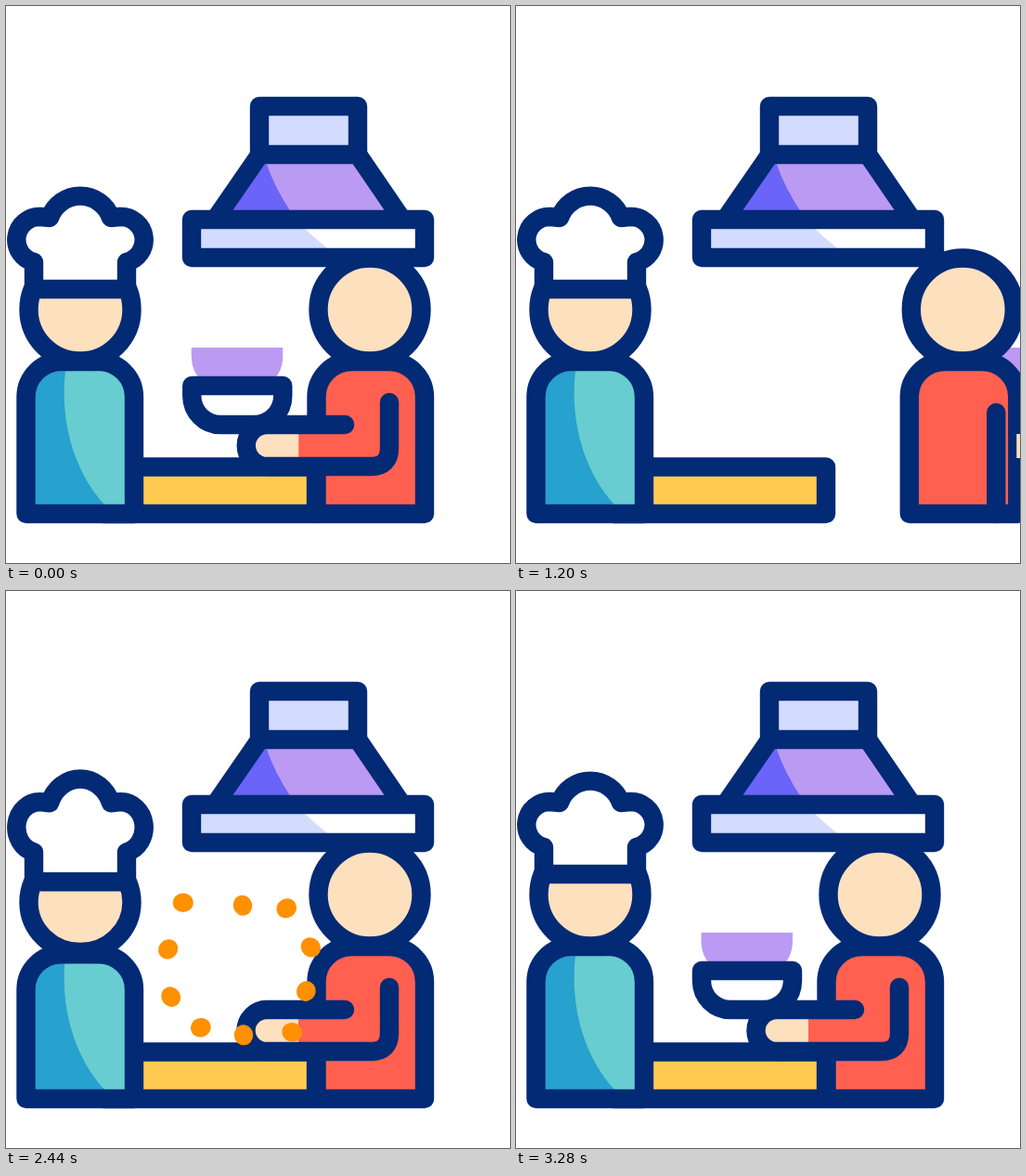
Write an HTML page with a canvas that moves like this. It is 543x600 px and loops after 3.3 s.

```html
<!DOCTYPE html>
<html lang="en">
<head>
<meta charset="utf-8">
<title>Kitchen service</title>
<style>
  html, body { margin: 0; width: 100%; height: 100%; overflow: hidden; background: #fff; }
  canvas { display: block; }
</style>
</head>
<body>
<canvas id="stage" width="543" height="600"></canvas>
<script>
const ctx = document.getElementById('stage').getContext('2d');
const LOOP = 3300;
const NAVY = '#032a75', SKIN = '#fde0be', RED = '#ff6050', YELLOW = '#fecb50', TEAL = '#68cdd0',
      BLUE = '#27a1cd', PURPLE = '#bb9af3', INDIGO = '#6a64f8', PALE = '#d3dcff', ORANGE = '#ff9000';
const SPARKS = [[-59, -72], [5, -69], [52, -66], [78, -24], [73, 23],
                [58, 67], [6, 70], [-40, 62], [-72, 29], [-75, -22]];

const clamp = v => Math.max(0, Math.min(1, v));
const ramp = (t, a, b) => clamp((t - a) / (b - a));

// Piecewise linear value through [time, value] pairs.
function keys(t, list) {
  let value = list[0][1];
  for (let i = 1; i < list.length; i++) {
    value += (list[i][1] - list[i - 1][1]) * ramp(t, list[i - 1][0], list[i][0]);
  }
  return value;
}

function fill(d, color) {
  ctx.fillStyle = color;
  ctx.fill(new Path2D(d));
}

function line(d) {
  ctx.stroke(new Path2D(d));
}

function shape(d, color) {
  fill(d, color);
  line(d);
}

function group(draw, x = 0, y = 0) {
  ctx.save();
  ctx.translate(x, y);
  draw();
  ctx.restore();
}

const bodyPath = dy => `M21.5 547V${421 + dy}A38 38 0 0 1 59.5 ${383 + dy}H100A38 38 0 0 1 138 ${421 + dy}V547Z`;

function head(x, y, ry) {
  ctx.beginPath();
  ctx.ellipse(x, y, 55.5, ry, 0, 0, 7);
  ctx.fillStyle = SKIN;
  ctx.fill();
  ctx.stroke();
}

function hood() {
  fill('M273 165L230 228H425L384 165Z', PURPLE);
  fill('M280 168Q289 195 307 222H230L270 165Z', INDIGO);
  line('M273.5 160L226.5 228M379 160L425.5 228');
  shape('M273 108H379V160H273Z', PALE);
  fill('M200 230H451V271H200Z', '#fff');
  fill('M200 230H312Q330 249 359 271H200Z', PALE);
  line('M200 230H451V271H200Z');
}

function chef(dy) {
  const down = dy > 0;
  const sy = 1 + dy * (down ? 0.0125 : 0.0045);
  const puff = down ? 0 : -dy * 0.37;
  const y = v => 305 + dy - (305 - v) * sy;

  fill(bodyPath(dy), '#fff');
  group(() => {
    const top = 393 + dy / 2;
    ctx.clip(new Path2D(`M21 547V${top + 32}A42 32 0 0 1 63 ${top}H96A42 32 0 0 1 138 ${top + 32}V547Z`));
    fill('M21 370H138V547H21Z', TEAL);
    fill('M21 370H68Q65 384 64 393C58 445 72 500 106 537V547H21Z', BLUE);
  });
  line(bodyPath(dy));
  head(80, 327 + dy, 55.5 - Math.abs(dy) * 0.22);

  const puffRadius = `${24.9 + puff} ${24.9 * sy}`;
  shape(`M30 ${305 + dy}V${y(276)}A${puffRadius} 0 0 1 ${37 - puff / 2} ${y(227)}L47 ${y(228)}
    A35 ${35 * sy} 0 0 1 113 ${y(228)}L${123 + puff / 2} ${y(227)}
    A${puffRadius} 0 0 1 130 ${y(276)}V${305 + dy}Z`, '#fff');
}

function bowl(lift, pop) {
  ctx.translate(249, 430);
  ctx.scale(pop, pop);
  ctx.translate(-249, -430);
  group(() => {
    ctx.rotate(-lift * 0.0014);
    fill('M-49.5 -16H49V-8Q49 16 30 24H-30Q-49.5 16 -49.5 -8Z', PURPLE);
  }, 249, 384 + lift * 0.33);
  shape('M200 409H298V420A31 31 0 0 1 267 451H231A31 31 0 0 1 200 420Z', '#fff');
}

function waiter(turn, lift, pop) {
  const turned = turn > 0.55;
  const move = 223 * turn;
  const elbow = { x: 393 + 35 * turn, y: 496 + 51 * turn };
  const shoulder = { x: 413 + 15 * turn, y: 427 + 11 * turn };
  const sleeve = `Q${shoulder.x} ${elbow.y} ${shoulder.x} ${elbow.y - 20}V${shoulder.y}`;
  const tip = 258 + move;

  if (pop) group(() => bowl(lift, pop), 227 * turn);
  if (turned) line(`M${tip - 41} 451H${tip - 10}Q${tip} 451 ${tip} 461V482L${tip - 10} 492H${tip - 41}`);

  head(392, 327, 55.5);
  group(() => shape(bodyPath(0), RED), 313);

  if (turned) {
    line(`M${elbow.x} ${elbow.y}${sleeve}`);
    // The palm shows only past the inner edge of the body outline.
    group(() => {
      ctx.clip(new Path2D('M450 440H543V520H450Z'));
      fill(`M${tip - 41} 461H${tip - 20}A12 13 0 0 1 ${tip - 20} 487H${tip - 41}Z`, SKIN);
    });
  } else {
    const hand = 281 + move, cuff = 315 + move, end = 365 + 85 * turn;
    const arc = `${hand} 451A22.5 22.5 0 0 0 ${hand} 496`;
    fill(`M${Math.max(cuff, end)} 451L${arc}L${elbow.x} ${elbow.y}Z`, RED);
    fill(`M${cuff} 451L${arc}H${cuff}Z`, SKIN);
    line(`M${end} 451L${arc}L${elbow.x} ${elbow.y}${sleeve}`);
  }
}

function sparks(t) {
  const spread = (t - 2210) / 230;
  const size = 11 * Math.min(ramp(t, 2210, 2310), 1 - ramp(t, 2520, 2660));
  if (size <= 0) return;
  ctx.fillStyle = ORANGE;
  SPARKS.forEach(([x, y], i) => {
    ctx.beginPath();
    ctx.ellipse(250 + x * spread, 408 + y * spread, size, size * 0.93, i * 1.3, 0, 7);
    ctx.fill();
  });
}

function draw(t) {
  const leaving = t < 1760;
  const shift = leaving ? Math.max(0, t - 900) * 0.2967 : Math.max(0, 2210 - t) * 0.882;
  const bounce = keys(t, [[2340, 0], [2560, 18], [2780, -32], [3280, 0]]);
  const turn = leaving ? ramp(t, 0, 900) : 0;
  const pop = leaving ? 1 : ramp(t, 2450, 2640);

  ctx.fillStyle = '#fff';
  ctx.fillRect(0, 0, 543, 600);
  ctx.strokeStyle = NAVY;
  ctx.lineWidth = 20.4;
  ctx.lineCap = ctx.lineJoin = 'round';

  shape('M105 496.5H334V547H105Z', YELLOW);
  chef(bounce);
  group(() => waiter(turn, Math.min(0, bounce), pop), shift);
  hood();
  sparks(t);
}

function frame() {
  draw(performance.now() % LOOP);
  requestAnimationFrame(frame);
}
frame();
</script>
</body>
</html>
```
